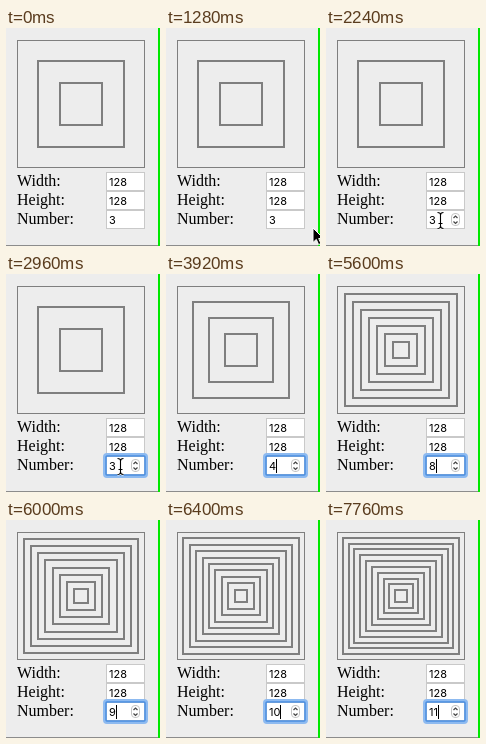
An HTML page for the animation above (8 s loop, 154x218 px).

```html
<!DOCTYPE html>
<html lang="en">
<head>
<meta charset="utf-8">
<title>Nested squares</title>
<style>
  html, body { margin: 0; width: 100%; height: 100%; overflow: hidden; background: #ededed; }
  svg { display: block; width: 154px; height: 218px; }
  rect, .squares { shape-rendering: crispEdges; }
  .label { font: 16px "Liberation Serif", serif; }
  .value { font: 11px Inter, sans-serif; }
  .field { fill: #fff; stroke: #c9c9c9; }
  .squares { fill: none; stroke: #7f7f7f; stroke-width: 2; }
  .ring rect { fill: none; shape-rendering: auto; }
</style>
</head>
<body>
<svg viewBox="0 0 154 218">
  <rect width="154" height="218" fill="#ededed"/>
  <rect y="217" width="152" height="1" fill="#8c8c8c"/>
  <rect x="152" width="2" height="218" fill="#00e800"/>

  <rect x="11.5" y="12.5" width="127" height="127" fill="none" stroke="#7f7f7f"/>
  <path class="squares" id="squares"/>

  <g class="label">
    <text x="11" y="158">Width:</text>
    <text x="11" y="177">Height:</text>
    <text x="11" y="196">Number:</text>
  </g>
  <rect class="field" x="100.5" y="144.5" width="38" height="18"/>
  <rect class="field" x="100.5" y="163.5" width="38" height="18"/>
  <rect class="field" x="100.5" y="182.5" width="38" height="18"/>
  <g class="ring" id="ring">
    <rect x="98.5" y="180.5" width="42" height="22" rx="2.5" stroke="#8dbaf0" stroke-width="3"/>
    <rect x="100" y="182" width="39" height="19" rx="1" stroke="#4a8fe2" stroke-width="1.5"/>
  </g>
  <g class="value">
    <text x="103" y="158">128</text>
    <text x="103" y="177">128</text>
    <text x="103" y="196" id="number">3</text>
  </g>
  <rect id="caret" y="185" width="1" height="14"/>

  <g id="spinner" fill="none">
    <rect x="125.5" y="185.5" width="8" height="12" rx="3.5" fill="#fff" stroke="#c4c4c4" style="shape-rendering:auto"/>
    <path d="M127.5 190l2-2 2 2M127.5 193.5l2 2 2-2" stroke="#444" stroke-width="1.2"/>
  </g>
  <path id="arrow" d="M0 0V14.5L3.3 11.4 5.6 16.6 8 15.6 5.7 10.5H10.5Z" stroke="#fff"/>
  <g id="beam" fill="none">
    <path d="M-3-8Q0-8 0-5.5Q0-8 3-8M0-6V6M-3 8Q0 8 0 5.5Q0 8 3 8M-2 3H2" stroke="#fff" stroke-width="2.6"/>
    <path d="M-3-8Q0-8 0-5.5Q0-8 3-8M0-6V6M-3 8Q0 8 0 5.5Q0 8 3 8M-2 3H2" stroke="#000" stroke-width="1.1"/>
  </g>
</svg>
<script>
  const LOOP = 8000, CLICK = 2480, FIRST_KEY = 3840;
  const center = { x: 75, y: 76 }, size = 128;
  const keyTimes = [FIRST_KEY, 4320, 4800, 5200, 5600, 6000, 6400, 6720];
  // [time, x, y] of the pointer
  const pointer = [
    [1280, 147, 200], [1360, 143, 199], [1440, 138, 198], [1520, 134, 197], [1600, 132, 196],
    [1840, 127, 194], [1920, 121, 193], [2000, 118, 193], [2240, 115, 193]
  ];
  const el = Object.fromEntries([...document.querySelectorAll("[id]")].map(e => [e.id, e]));
  const show = (e, on) => e.setAttribute("visibility", on ? "visible" : "hidden");

  function squaresPath(count) {
    let d = "";
    for (let k = 1; k < count; k++) {
      const half = size * k / count / 2 + 1;
      const left = Math.round(center.x - half) + 1;
      const top = Math.round(center.y - half) + 1;
      const side = Math.round(center.x + half) - 1 - left;
      d += `M${left} ${top}h${side}v${side}h${-side}z`;
    }
    return d;
  }

  function render(t) {
    const pressed = keyTimes.filter(k => k <= t);
    const count = 3 + pressed.length;
    el.squares.setAttribute("d", squaresPath(count));
    el.number.textContent = count;

    const focused = t >= CLICK;
    const lastInput = pressed.at(-1) ?? CLICK;
    show(el.ring, focused);
    show(el.caret, focused && Math.floor((t - lastInput) / 480) % 2 === 0);
    el.caret.setAttribute("x", Math.round(103 + el.number.getComputedTextLength()));

    const [, x, y] = pointer.findLast(p => p[0] <= t) ?? [0, 200, 200];
    const overText = x < 125;
    show(el.spinner, x < 139);
    show(el.arrow, !overText);
    show(el.beam, overText && t < FIRST_KEY);
    el.arrow.setAttribute("transform", `translate(${x} ${y})`);
    el.beam.setAttribute("transform", `translate(${x - 0.5} ${y - 0.5})`);
  }

  function tick() {
    render(performance.now() % LOOP);
    requestAnimationFrame(tick);
  }
  tick();
</script>
</body>
</html>
```
